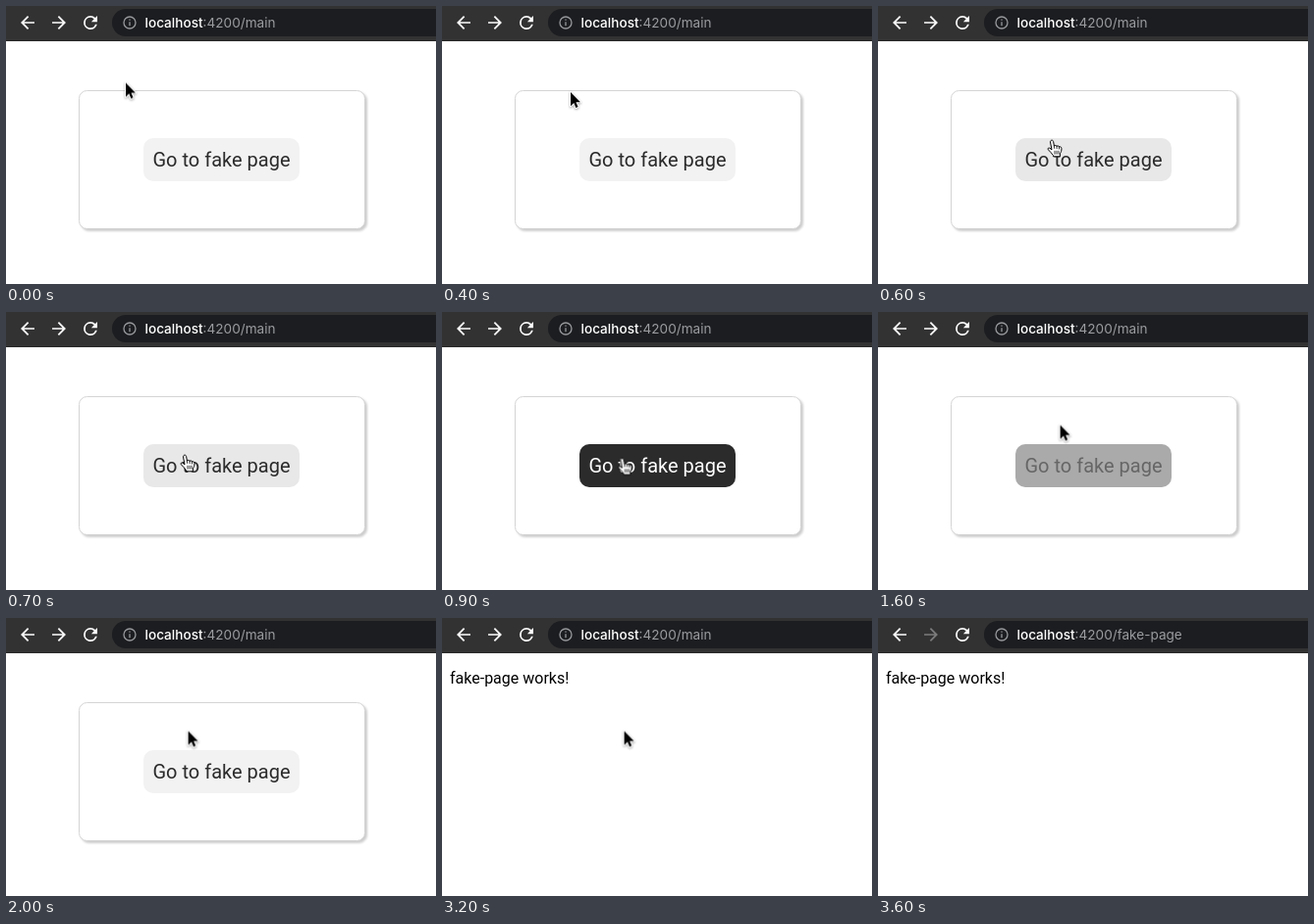
Recreate the animation shown at these times as an HTML page. Size 438 by 284 pixels, loop 4800 ms.

```html
<!DOCTYPE html>
<html lang="en">
<head>
<meta charset="utf-8">
<title>Page navigation</title>
<style>
  html, body { margin: 0; width: 100%; height: 100%; overflow: hidden; background: #fff; }
  svg { display: block; }

  .url { font: 13.6px Inter, "Open Sans", sans-serif; fill: #9a9c9f; }
  .host { font-weight: 500; fill: #fff; }
  .page { font: 16px Roboto, Arial, sans-serif; }
  .label { font: 20px Roboto, Arial, sans-serif; text-anchor: middle; fill: #2b2b2b; }
  .button { fill: #f2f2f2; }
  .icon { fill: #fff; }
  .card { fill: #fff; stroke: #d4d4d4; filter: drop-shadow(2px 2px 1px #0003); }
  .arrow { fill: #000; stroke: #fff; stroke-width: 2; stroke-linejoin: round;
           paint-order: stroke; filter: drop-shadow(0 1px 1px #0005); }
  .hand { fill: #fff; stroke: #000; stroke-linejoin: round; stroke-linecap: round; }

  /* Every change is a hard cut on a 100 ms grid. */
  .button, .label, .cursor, .arrow, .hand, .main, .fake, .old, .new, .forward {
    animation: 4.8s step-end infinite;
  }
  .cursor { animation-name: move; }
  .arrow { animation-name: arrow; }
  .hand { animation-name: hand; }
  .button { animation-name: button; }
  .label { animation-name: label; }
  .main { animation-name: leave-main; }
  .fake { animation-name: show-fake; }
  .old { animation-name: leave-url; }
  .new { animation-name: show-url; }
  .forward { animation-name: forward; }

  @keyframes move {
    0% { transform: translate(122px, 78.5px); }
    2.08% { transform: translate(123px, 79.5px); }
    8.33% { transform: translate(131px, 88px); }
    10.41% { transform: translate(157px, 116px); }
    12.5% { transform: translate(177px, 137px); }
    14.58% { transform: translate(182px, 146px); }
    16.66% { transform: translate(183.5px, 149.5px); }
    31.25% { transform: translate(185px, 138px); }
    33.33% { transform: translate(185.6px, 115.5px); }
    72.91%, 100% { transform: translate(105px, 115.5px); }
  }
  @keyframes arrow {
    0%, 33.33% { opacity: 1; }
    12.5%, 75%, 100% { opacity: 0; }
  }
  @keyframes hand {
    0%, 33.33%, 100% { opacity: 0; }
    12.5% { opacity: 1; }
  }
  @keyframes button {
    0%, 35.41%, 100% { fill: #f2f2f2; }
    12.5% { fill: #e8e8e8; }
    16.66% { fill: #969696; }
    18.75% { fill: #2b2b2b; }
    31.25% { fill: #565656; }
    33.33% { fill: #aaa; }
  }
  @keyframes label {
    0%, 35.41%, 100% { fill: #2b2b2b; }
    16.66% { fill: #747474; }
    18.75% { fill: #fff; }
    31.25% { fill: #c8c8c8; }
    33.33% { fill: #666; }
  }
  @keyframes leave-main { 0% { opacity: 1; } 66.66%, 100% { opacity: 0; } }
  @keyframes show-fake { 0% { opacity: 0; } 66.66%, 100% { opacity: 1; } }
  @keyframes leave-url { 0% { opacity: 1; } 68.75%, 100% { opacity: 0; } }
  @keyframes show-url { 0% { opacity: 0; } 68.75%, 100% { opacity: 1; } }
  @keyframes forward { 0% { fill: #fff; } 68.75%, 100% { fill: #7c7c7d; } }
</style>
</head>
<body>
<svg width="438" height="284" viewBox="0 0 438 284">
  <defs>
    <path id="back" d="M8 -1H-4.17L1.42 -6.59 0 -8-8 0 0 8 1.41 6.59-4.17 1H8z"/>
  </defs>

  <!-- Browser toolbar -->
  <rect width="438" height="36" fill="#323233"/>
  <rect y="35" width="438" height="1" fill="#29292a"/>
  <rect x="108" y="3" width="360" height="28" rx="14" fill="#1c1d20"/>
  <use href="#back" class="icon" transform="translate(22 17) scale(.87)"/>
  <use href="#back" class="forward" transform="translate(54 17) scale(-.87 .87)"/>
  <path class="icon" transform="translate(75.6 6.6) scale(.87)"
        d="M17.65 6.35A7.96 7.96 0 0 0 12 4a8 8 0 1 0 7.73 10h-2.08A6 6 0 1 1 12 6c1.66 0 3.14.69 4.22 1.78L13 11h7V4z"/>
  <g fill="none" stroke="#97999c" stroke-width="1.3">
    <circle cx="126" cy="17" r="6"/>
    <path d="M126 16.2v4M126 13.4v1.4"/>
  </g>
  <text class="url old" x="141.5" y="22"><tspan class="host">localhost</tspan>:4200/main</text>
  <text class="url new" x="141.5" y="22"><tspan class="host">localhost</tspan>:4200/fake-page</text>

  <g class="main">
    <rect class="card" x="74.5" y="86.5" width="291" height="141" rx="8"/>
    <rect class="button" x="140" y="135" width="159" height="44" rx="10"/>
    <text class="label" x="219.5" y="164">Go to fake page</text>
  </g>
  <text class="page fake" x="8" y="67">fake-page works!</text>

  <g class="cursor">
    <path class="arrow" d="M0 0V14.2L3.3 11.1 5.4 16 7.6 15 5.5 10.2H10z"/>
    <g class="hand">
      <path d="M-1.5 1.5C-1.5 -.3 1.3 -.4 1.6 1.4L2.4 6C3 5 4.8 5.2 5 6.4 5.6 5.5 7.3 5.8 7.5 7 8.3 6.4 9.8 6.8 9.9 8.3 10 11 9.6 12 8.4 13.8V16.8H1.6L1.4 15.5C0 13.5-1.5 12-3.6 9.8-4.6 8.6-3.2 7.4-2 8.2L-.3 9.6z"/>
      <path d="M2.4 6l.3 2.4M5 6.4l.2 2.2M7.5 7v2M3 11.2v3M5 11.2v3M7 11.2v3" fill="none" stroke-width=".8"/>
    </g>
  </g>
</svg>
</body>
</html>
```
